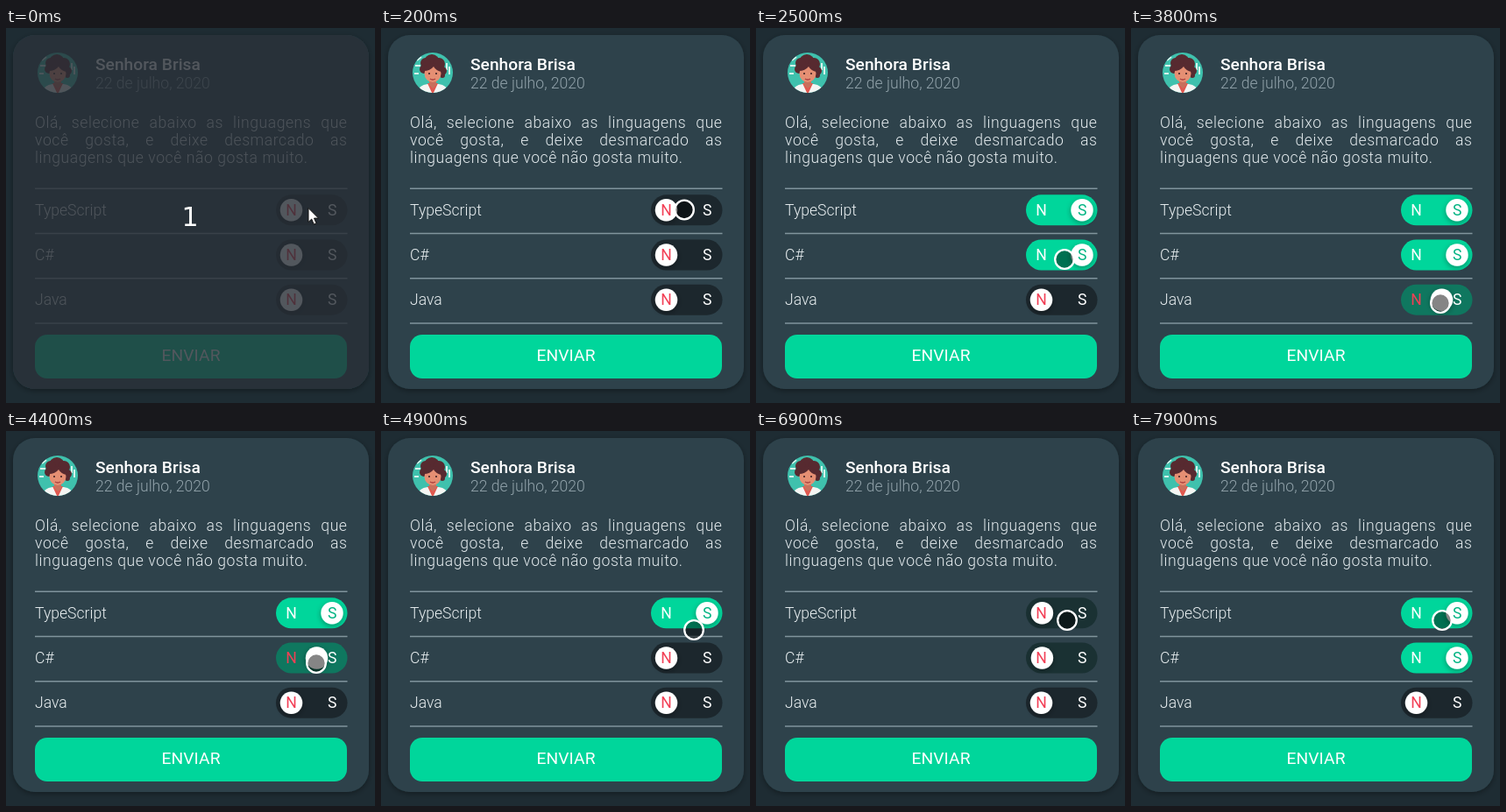
Animation of 421 by 428 pixels, one loop 8000 ms. Source, as an HTML page:

```html
<!DOCTYPE html>
<html lang="pt">
<head>
<meta charset="utf-8">
<style>
html, body { margin: 0; width: 100%; height: 100%; overflow: hidden; background: #1e2c33; }
svg { display: block; width: 421px; height: 428px; font: 300 17.6px Roboto, sans-serif; fill: #e9eff1; }
p { margin: 0; font: 300 17.6px/20px Roboto, sans-serif; letter-spacing: .55px; text-align: justify; color: #e3eaed; }
.pill text { font-weight: 400; text-anchor: middle; }
</style>
</head>
<body>
<svg viewBox="0 0 421 428">
  <defs>
    <filter id="soft" x="-20%" y="-20%" width="140%" height="140%">
      <feDropShadow dx="0" dy="2" stdDeviation="3" flood-opacity=".35"/>
    </filter>
    <clipPath id="round"><circle cx="59" cy="51" r="23"/></clipPath>
  </defs>
  <rect width="421" height="428" fill="#1e2c33"/>
  <rect x="8" y="8" width="406" height="404" rx="25" fill="#2d424b" filter="url(#soft)"/>

  <g clip-path="url(#round)">
    <rect x="36" y="28" width="46" height="46" fill="#3fc1ad"/>
    <path d="M39 43h6M41 37l5-4M38 52h5M75 40v8M78 44v9" stroke="#d8f3ec" stroke-width="2"/>
    <g fill="#572a30">
      <circle cx="58" cy="39" r="9"/><circle cx="51" cy="40" r="6"/><circle cx="66" cy="41" r="7"/>
      <circle cx="49" cy="47" r="5"/><circle cx="70" cy="49" r="5"/><circle cx="70" cy="54" r="3"/>
    </g>
    <path d="M41 76q1-11 12-12h13q10 1 12 12z" fill="#f5f5f3"/>
    <path d="M53 63l6 13 6-13z" fill="#e0584f"/>
    <path d="M55 58h8v7l-4 4-4-4z" fill="#c9705c"/>
    <ellipse cx="59" cy="52" rx="9.5" ry="10" fill="#e58f73"/>
    <path d="M49 49q1-9 9-9 10 0 11 10-6-1-9-6-4 5-11 5z" fill="#572a30"/>
    <path d="M56 58q3 2 6 0" fill="none" stroke="#a83d3d" stroke-width="1.4"/>
    <circle cx="55" cy="52" r="1.1" fill="#402326"/><circle cx="63" cy="52" r="1.1" fill="#402326"/>
  </g>

  <text x="102" y="48" font-size="19.2" font-weight="500" fill="#fff">Senhora Brisa</text>
  <text x="102" y="69" fill="#91a2aa">22 de julho, 2020</text>
  <foreignObject x="33" y="98" width="356.5" height="66">
    <p>Olá, selecione abaixo as linguagens que você gosta, e deixe desmarcado as linguagens que você não gosta muito.</p>
  </foreignObject>
  <path d="M33 183.2H389.5M33 234.5H389.5M33 285.8H389.5M33 337H389.5" stroke="#80949d" stroke-width="1.4"/>
  <g id="rows"></g>
  <rect x="33" y="350" width="356" height="50" rx="14" fill="#00d69b"/>
  <text x="211" y="380" text-anchor="middle" font-size="19.2" font-weight="400" letter-spacing=".1" fill="#fff">ENVIAR</text>

  <circle id="ring" r="10.8" fill="#000" fill-opacity=".48" stroke="#fff" stroke-width="2.3"/>
  <g id="intro">
    <rect x="8" y="8" width="406" height="404" rx="25" fill="#272d35" fill-opacity=".8"/>
    <text x="210" y="226" text-anchor="middle" style="font: 30px 'DejaVu Sans', sans-serif" fill="#fff">1</text>
    <path d="M345 205.5v16l3.7-3.4 2.6 6 2.8-1.2-2.6-5.8h5z" fill="#fff" stroke="#111" stroke-width="1"/>
  </g>
</svg>
<script>
const $ = id => document.getElementById(id);
const LOOP = 8000, STEP = 100;
const OFF = [28, 39, 45], ON = [0, 214, 155];

// Each switch flips at these times
const rows = [
  { label: 'TypeScript', y: 207.8, flips: [800, 6750, 7700] },
  { label: 'C#', y: 259, flips: [1600, 4400, 5500, 6750, 7700] },
  { label: 'Java', y: 310.2, flips: [3000, 3800] }
];

// Pointer path: time, x, y
const path = [
  [0, 346, 207.5], [1200, 346, 207.5], [1300, 353, 238], [1400, 353, 238],
  [1500, 352, 258], [2400, 352, 258], [2500, 352, 264], [2900, 353, 314],
  [4000, 353, 314], [4400, 354, 265], [4600, 354, 267], [4900, 357, 227],
  [5000, 357, 222], [5100, 357, 222], [5400, 355, 265], [5600, 355, 265],
  [6000, 356, 218], [6200, 355, 216], [LOOP, 355, 216]
];

const clamp = u => Math.max(0, Math.min(1, u));
const smooth = u => u * u * (3 - 2 * u);
const mix = (a, b, u) => a + (b - a) * u;

$('rows').innerHTML = rows.map(({ label, y }) => `
  <text x="33" y="${y + 6}">${label}</text>
  <g class="pill">
    <rect x="308" y="${y - 17.5}" width="81.5" height="35" rx="17.5"/>
    <circle cy="${y}" r="12.7" fill="#fff" filter="url(#soft)"/>
    <text x="325.5" y="${y + 6.2}">N</text><text x="372.3" y="${y + 6.2}">S</text>
  </g>`).join('');
const pills = [...document.querySelectorAll('.pill')];

function drawSwitch({ flips }, i, t) {
  let slide = 0, tint = 0, on = false;
  for (const start of flips) {
    if (t < start - STEP / 2) break;
    const u = clamp((t - start + 125) / 300);
    const sign = on ? -1 : 1;
    slide += sign * smooth(u);
    tint += sign * u ** .7; // the colour leads the thumb
    on = !on;
  }
  const [track, thumb, no, yes] = pills[i].children;
  track.setAttribute('fill', `rgb(${OFF.map((c, k) => Math.round(mix(c, ON[k], tint)))})`);
  thumb.setAttribute('cx', mix(325.5, 372, slide));
  no.setAttribute('fill', on ? '#fff' : '#f23f55');
  yes.setAttribute('fill', on ? '#00b483' : '#fff');
}

function pointerAt(t) {
  const i = path.findIndex(p => p[0] > t);
  const [a, b] = [path[i - 1], path[i]];
  const u = (t - a[0]) / (b[0] - a[0]);
  return [mix(a[1], b[1], u), mix(a[2], b[2], u)];
}

function draw(now) {
  const t = Math.floor(now / STEP) * STEP % LOOP;
  rows.forEach((row, i) => drawSwitch(row, i, t));
  const intro = t < 200;
  $('intro').setAttribute('visibility', intro ? 'visible' : 'hidden');
  $('ring').setAttribute('visibility', intro ? 'hidden' : 'visible');
  $('ring').setAttribute('transform', `translate(${pointerAt(t)})`);
}

const origin = performance.now();
function tick() {
  draw(performance.now() - origin);
  requestAnimationFrame(tick);
}
tick();
</script>
</body>
</html>
```
